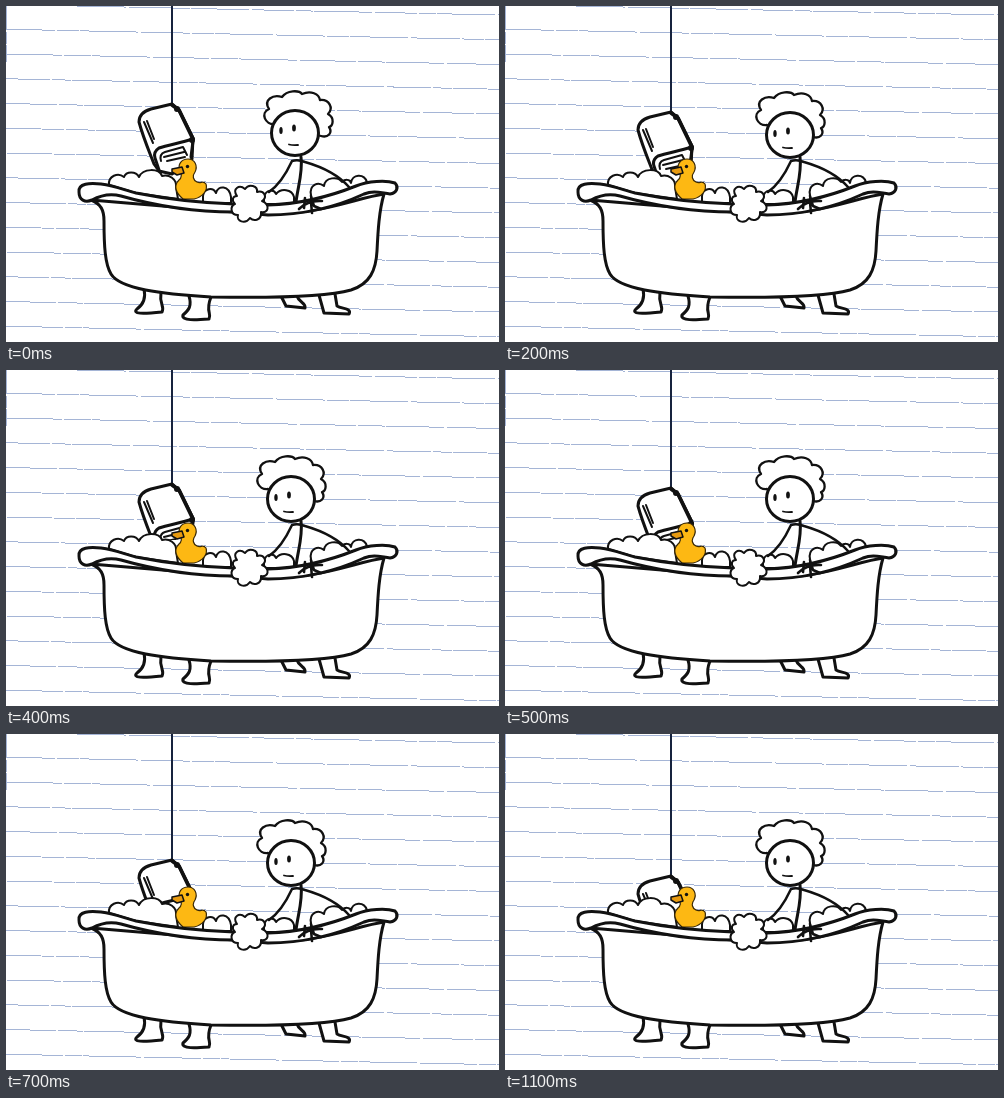
An HTML page for the animation above (1200 ms loop, 493 px wide and 336 px high).

```html
<!DOCTYPE html>
<html lang="en">
<head>
<meta charset="utf-8">
<title>Bath time</title>
<style>
  html, body { margin: 0; width: 100%; height: 100%; overflow: hidden; background: #fff; }
  svg { display: block; width: 493px; height: 336px; }
  .ink { fill: none; stroke: #111; stroke-width: 3; stroke-linecap: round; stroke-linejoin: round; }
  .white { fill: #fff; }
  .thin { stroke-width: 2; }
  .bold { stroke-width: 3.8; }
  .dot { fill: #111; }
  .rule { stroke: #a5b5d6; stroke-width: 1; shape-rendering: crispEdges; }
</style>
</head>
<body>
<svg viewBox="0 0 493 336">
  <clipPath id="aboveWater"><path d="M100 0H200V157H178L170 170H100Z"/></clipPath>
  <g id="paper"></g>
  <path d="M.5 0V56" stroke="#a5b5d6" stroke-dasharray="24 2 12 1"/>
  <path id="wire" fill="none" stroke="#17233d" stroke-width="2"/>

  <g clip-path="url(#aboveWater)">
    <g id="toaster" class="ink">
      <path class="white" d="M148 158C143 145 137 131 133 116C133 109 138 105 145 103L166 98L173 104L187 132L186 153L166 168L153 165Z"/>
      <path class="bold" d="M166 99L173 104L187 133"/>
      <path d="M187 133C174 137 162 139 153 142Q147 146 149 152L153 164M187 135L185 151"/>
      <path class="thin" d="M138 116L147 137M141 115L148 133"/>
      <path class="thin" d="M155 155Q153 148 159 146L177 141L181 149M158 151L178 146M161 155L179 151"/>
      <circle class="dot" cx="186" cy="134" r="1.5"/>
      <circle class="dot" cx="171" cy="103" r="1.5"/>
    </g>
  </g>

  <g class="ink thin">
    <path class="white" d="M103 179C102 170 112 166 118 171C120 165 130 165 133 171C137 162 153 162 156 170C163 168 171 173 170 181L172 193L130 187Z"/>
    <path class="white" d="M197 190C198 182 207 181 210 187C212 179 223 179 225 191V197H197Z"/>
    <path class="white" d="M258 191C260 183 268 183 270 188C275 182 286 183 288 191V198H258Z"/>
    <path class="white" d="M305 189C303 179 312 175 318 180C319 171 332 170 336 176C339 173 344 173 345 177C346 168 358 167 361 176L345 184L305 196Z"/>
  </g>

  <g id="hair"><path class="ink white" style="stroke-width:2.3" d="M262 119C252 120 247 108 256 104C250 95 260 89 269 92C274 85 286 85 289 89C298 85 306 89 307 95C316 94 321 103 315 109C322 113 320 121 316 122C320 128 315 133 308 131Z"/></g>
  <g class="ink">
    <path d="M295 151C297 166 292 180 290 196"/>
    <path style="stroke-width:2.5" d="M263 186C273 179 280 168 286 155Q292 153 299 156C320 162 335 172 343 181"/>
  </g>
  <g id="head">
    <ellipse class="ink white" cx="285" cy="129" rx="23.5" ry="22.5"/>
    <g id="face">
      <ellipse class="dot" cx="270" cy="127.500" rx="1.700" ry="3.500"/>
      <ellipse class="dot" cx="283" cy="125" rx="1.900" ry="3.500"/>
      <path class="ink" style="stroke-width:1.8" d="M278 141.500Q282 142.500 287 142"/>
    </g>
  </g>

  <g stroke-linejoin="round">
    <path fill="#fdb813" stroke="#3a2905" stroke-width="1.2" d="M174 165C171 158 176 153 182 153C189 153 192 160 189 166C186 170 187 174 191 176C195 178 197 174 200 178C202 184 197 191 188 193H177C170 187 167 180 173 174Q177 171 174 165Z"/>
    <path fill="#e79a10" stroke="#111" stroke-width="1.5" d="M166 163L176 161L178 167L171 169L166 166Z"/>
    <circle class="dot" cx="181.500" cy="160.500" r="1.700"/>
  </g>

  <g class="ink">
    <path class="white" d="M138 283C140 292 138 298 131 303C126 308 136 308 156 306C159 300 153 299 155 286"/>
    <path class="white" d="M183 290C186 300 183 304 177 309C175 315 190 314 203 313C206 307 199 306 205 291"/>
    <path class="white" d="M275 290L280 300L299 302C300 296 293 297 291 290"/>
    <path class="white" d="M313 289L318 307L343 308C346 302 336 303 331 300L329 288"/>
    <path class="white" d="M85 194C95 198 98 204 98 215C98 240 99 258 105 268C114 283 155 288 205 291C260 292 320 291 345 284C364 278 370 264 371 245C372 225 373 205 378 188C350 192 310 210 262 207L228 206Z"/>
    <path class="white" d="M73 186C72 177 84 177 95 178C110 180 118 184 130 187C160 193 200 197 228 198L262 199C300 198 330 188 350 180C362 175 380 174 389 177C393 181 391 187 384 188C375 187 368 184 358 188C330 201 300 209 262 209L228 206C190 206 150 200 115 190C104 187 95 189 86 194C79 197 73 194 73 186Z"/>
    <path class="white thin" d="M231 190C226 183 233 178 239 183C243 177 252 180 251 186C258 184 262 191 256 195C265 199 262 208 255 206C256 214 248 216 244 212C239 219 230 215 232 209C224 209 224 200 229 198C225 194 227 190 231 190Z"/>
    <path style="stroke-width:2.6" d="M293 203Q302 194 316 195M299 192L298 202M305 190L308 200L315 203M305 196L306 207"/>
  </g>
</svg>
<script>
const LOOP = 1200, STEP = 100, DROP = 4;
const byId = id => document.getElementById(id);
const shift = (id, x, y) => byId(id).setAttribute('transform', `translate(${x} ${y})`);

function rulePaper() {
  let lines = '';
  for (let i = 0; i < 14; i++) {
    const y = -1.5 + i * 24.75;
    const dash = `${42 + i * 7 % 19} 2 ${17 + i * 5 % 13} 1 58 3`;
    lines += `<path class="rule" stroke-dasharray="${dash}" d="M0 ${y}L493 ${y + 10.5}"/>`;
  }
  byId('paper').innerHTML = lines;
}

function draw(time) {
  const step = Math.floor(time % LOOP / STEP);
  const drop = step * DROP;
  const glance = step === 0;
  byId('wire').setAttribute('d', `M166 0V${99 + drop}`);
  shift('toaster', 0, drop);
  shift('hair', glance ? 7 : 0, glance ? -1 : 0);
  shift('head', glance ? 4 : 0, glance ? -2 : 0);
  shift('face', glance ? 1 : 0, glance ? -1 : 0);
}

rulePaper();
const start = performance.now();
function tick() {
  draw(performance.now() - start);
  requestAnimationFrame(tick);
}
tick();
</script>
</body>
</html>
```
